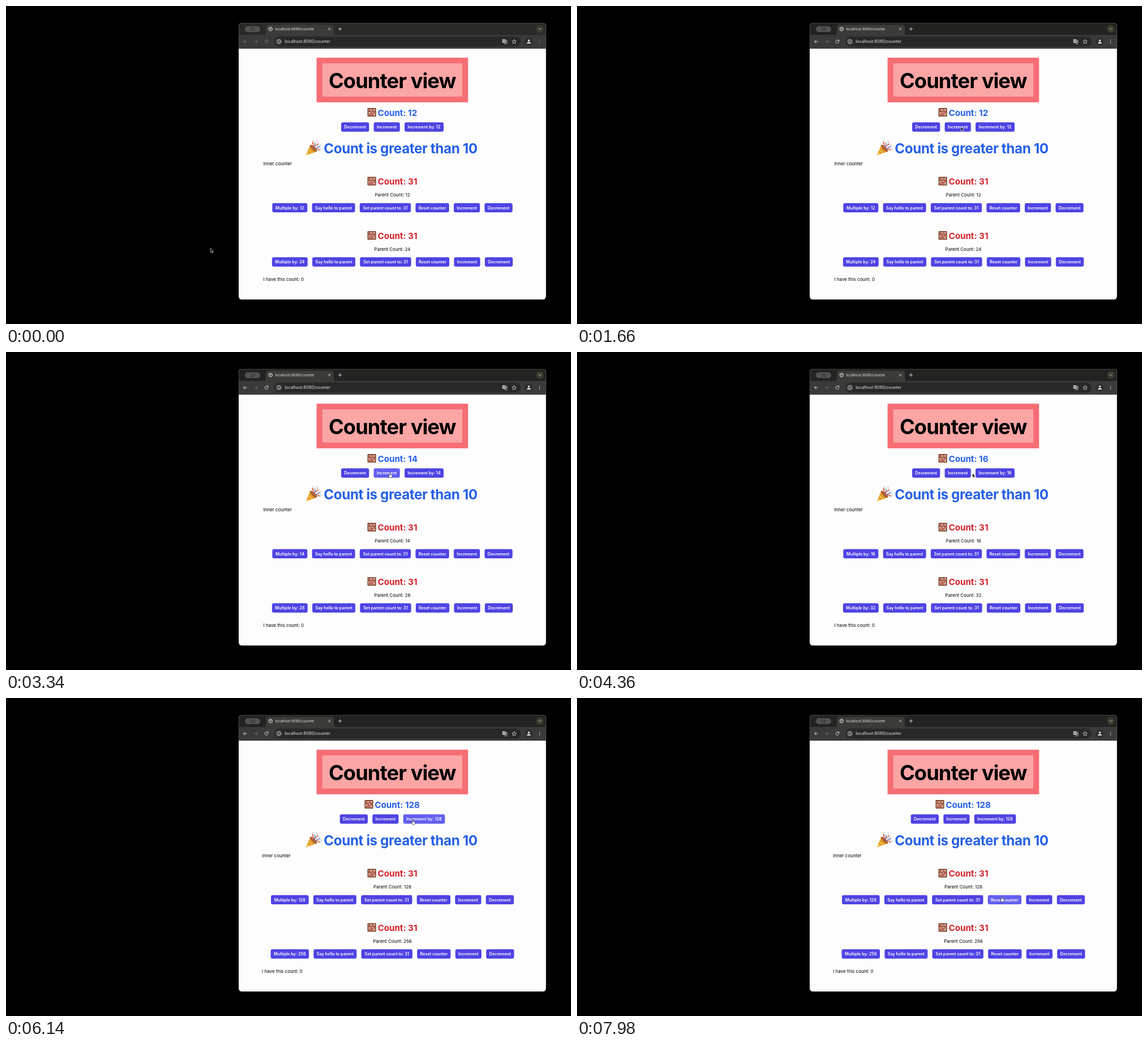
These frames come from a looping animation (998 px wide and 561 px high, 8 s). An HTML page:

```html
<!DOCTYPE html>
<html lang="en">
<head>
<meta charset="utf-8">
<title>Counter view</title>
<style>
html, body { margin: 0; width: 100%; height: 100%; overflow: hidden; background: #000; }
svg { display: block; width: 100%; height: 100%; font-family: Inter, "Liberation Sans", sans-serif; font-optical-sizing: none; }
.mid { text-anchor: middle; }
.title { font-size: 36.3px; font-weight: 700; letter-spacing: -.026em; }
.note { font-size: 24.2px; font-weight: 700; letter-spacing: -.016em; fill: #2560e8; }
.count { font-size: 15.2px; font-weight: 700; }
.body { font-size: 8px; }
.btn { font-size: 7.25px; font-weight: 600; fill: #fff; text-anchor: middle; }
.line { fill: none; stroke-width: .9; stroke-linecap: round; stroke-linejoin: round; }
</style>
</head>
<body>
<svg viewBox="0 0 998 561">
  <defs>
    <g id="abacus">
      <rect width="15" height="15" rx=".8" fill="#74371f"/>
      <rect x="1.6" y="1.6" width="11.8" height="11.8" fill="#ead2c2"/>
      <path d="M3.4 1V14M6.1 1V14M8.9 1V14M11.6 1V14" stroke="#8b4a2c" stroke-width=".7"/>
      <path d="M3.4 2v5M6.1 6v6.6M8.9 2v3.4M8.9 8.4v4.4M11.6 4.6v5M3.4 10.4v2.6" stroke="#a8322a" stroke-width="2.1" stroke-dasharray="1.5 .3"/>
      <path d="M1 5.6H14" stroke="#74371f" stroke-width=".8"/>
    </g>
    <g id="popper">
      <path d="M0 25L7.5 6.5Q16 9.5 19 18.3Z" fill="#f3b73b"/>
      <path d="M3.2 17.2L8.4 22M5.2 12.2L13.6 20.2" stroke="#cf8424" stroke-width="1.3"/>
      <ellipse cx="13.4" cy="12.5" rx="8.2" ry="3.3" transform="rotate(46 13.4 12.5)" fill="#a8642a"/>
      <path d="M11 11Q15 7 11.5 1.5M14 13Q17 6 22 5M16 15Q20 12 25 16" fill="none" stroke-width="1.5" stroke-linecap="round" stroke="#e0523f"/>
      <path d="M13 11Q17 8 16 3M17 14Q21 9 25 10" fill="none" stroke-width="1.3" stroke-linecap="round" stroke="#4386d8"/>
      <g id="bits"></g>
    </g>
    <path id="arrow" d="M0 0V7.3L1.7 5.8L2.9 8.4L4.1 7.9L3 5.3L5.2 5.2Z" fill="#000" stroke="#fff" stroke-width=".65"/>
    <path id="hand" d="M-.9 .8a.9.9 0 0 1 1.8 0V3.2L3.5 3.9Q4.5 4.2 4.3 5.3L3.9 7.5Q3.7 8.4 3 8.4H-.2Q-.8 8.4-1.2 7.7L-2.6 5.4Q-2.8 4.5-2 4.6L-.9 5.5Z" fill="#fff" stroke="#111" stroke-width=".6"/>
    <clipPath id="frame"><rect x="411" y="30" width="542.8" height="487.8" rx="5.5"/></clipPath>
  </defs>
  <g clip-path="url(#frame)">
    <rect x="411" y="30" width="543" height="488" fill="#fdfdfd"/>
    <rect id="strip" x="411" y="30" width="543" height="22"/>
    <rect x="411" y="51" width="543" height="24.3" fill="#3a3a3b"/>
    <path d="M455 51.5Q459 51.5 459 47V38Q459 33 464 33H574Q579 33 579 38V47Q579 51.5 583 51.5Z" fill="#3b3b38"/>
    <rect x="422" y="35.7" width="27" height="10.4" rx="5.2" fill="#535353"/>
    <path d="M431 39H440M433 41H440M431 43.2H440" stroke="#35362f" stroke-width="1"/>
    <rect x="474" y="54" width="435" height="17.6" rx="8.8" fill="#282829"/>
  </g>
  <path d="M411.3 75V35.5Q411.3 30.3 416.5 30.3H948.3Q953.5 30.3 953.5 35.5V75" fill="none" stroke="#5d5d58" stroke-width=".6"/>
  <g class="line" stroke="#dedede">
    <circle cx="467.2" cy="40.6" r="3.3"/>
    <path d="M464.4 39.2L467 40.3L466.4 42L468 43.5M467.3 37.6L468.3 39.6L470.2 40"/>
    <path d="M569.6 38.9L573 42.3M573 38.9L569.6 42.3M587.2 40.6H592.8M590 37.8V43.4"/>
    <circle cx="943" cy="40.6" r="6.6" fill="#3d3e31" stroke="none"/>
    <path d="M941.2 39.8L943 41.6L944.8 39.8"/>
    <circle cx="482" cy="62.8" r="6.3" fill="#38393a" stroke="none"/>
    <circle cx="482" cy="62.8" r="3.4"/><path d="M482 62.6V64.4M482 61V61.1"/>
    <path d="M897.6 59.2L898.7 61.7L901.4 61.9L899.3 63.7L900 66.4L897.6 64.9L895.2 66.4L895.9 63.7L893.8 61.9L896.5 61.7Z" stroke-width=".8"/>
    <rect x="876.8" y="58.8" width="5.6" height="6.2" rx=".8" fill="#c9c9c9" stroke="none"/>
    <path d="M882.8 60.6H885V66.8H880.4M882 63H884.2M883 63L881.8 65.4" stroke-width=".7"/>
    <path d="M880.8 61H879Q878 61.8 879 62.8H880.6V62" stroke="#282829" stroke-width=".7"/>
    <circle cx="923.5" cy="62.8" r="7.2" fill="#2f2f31" stroke="none"/>
    <circle cx="923.5" cy="61" r="1.8" fill="#e4e4e4" stroke="none"/>
    <path d="M920 66.3Q920 63.4 923.5 63.4Q927 63.4 927 66.3Z" fill="#e4e4e4" stroke="none"/>
  </g>
  <path d="M438 62.8H444M441.5 60.2L444.1 62.8L441.5 65.4" class="line" stroke="#77777a"/>
  <g id="tools" class="line">
    <path d="M425.4 62.8H419.6M422.2 60.2L419.6 62.8L422.2 65.4"/>
    <path d="M462.6 61.4A2.9 2.9 0 1 0 462.8 63.6M462.9 59.6V61.7H460.8"/>
    <path d="M942.5 60.2V60.3M942.5 62.8V62.9M942.5 65.4V65.5" stroke-width="1.4"/>
  </g>
  <text x="475.4" y="42.8" font-size="6.25" fill="#e2e2e0">localhost:8080/counter</text>
  <text x="492.3" y="65.4" font-size="7.3" fill="#e8e8e8">localhost:8080/counter</text>
  <rect x="548.6" y="91.2" width="267.6" height="78.7" fill="#f56e74"/>
  <rect x="558.7" y="101.2" width="247.3" height="58.5" fill="#fba5a5"/>
  <text class="title mid" x="682.2" y="145">Counter view</text>
  <use href="#popper" x="529.7" y="238.5"/>
  <text class="note mid" x="697" y="260.3">Count is greater than 10</text>
  <g id="page"></g>
  <use id="cursor"/>
</svg>
<script>
const LOOP = 8000, MID = 682.5, GAP = 8.25;
const $ = id => document.getElementById(id);

const BITS = ["#e0523f", "#4386d8", "#f3b73b", "#55a860", "#b55fc0"];
$("bits").innerHTML = Array.from({ length: 14 }, (_, i) => {
  const a = -1.75 + i * 0.17, r = 8 + (i * 5 % 7);
  return `<circle cx="${13 + r * Math.cos(a)}" cy="${12 + r * Math.sin(a)}" r=".75" fill="${BITS[i % 5]}"/>`;
}).join("");

// start, end, then where the pointer lands
const MOVES = [
  [60, 760, 678, 232.8], [1050, 1350, 678, 213.2], [4180, 4540, 718.6, 215], [6550, 7500, 750.3, 350.8]
];
const START = [361.2, 427.4];
// time of each click and the count it leaves
const CLICKS = [[0, 12], [2700, 13], [3060, 14], [3480, 15], [3840, 16], [4960, 32], [5340, 64], [5740, 128]];
const FOCUS = 1560, HOVER = 2440;

const ease = p => p * p * (3 - 2 * p);

function pointer(t) {
  let [x, y] = START;
  for (const [from, to, tx, ty] of MOVES) {
    const p = ease(Math.min(1, Math.max(0, (t - from) / (to - from))));
    x += (tx - x) * p;
    y += (ty - y) * p;
  }
  return [x, y];
}

const digits = n => [...String(n)].reduce((w, d) => w + (d === "1" ? 3.7 : 4.6), 0);

function place(items, y) {
  const total = items.reduce((w, b) => w + b[1], GAP * (items.length - 1));
  let x = MID - total / 2;
  return items.map(([label, w]) => {
    const b = { label, w, x, y: y - 8.2 };
    x += w + GAP;
    return b;
  });
}

const INC = ["Increment", 46.2], DEC = ["Decrement", 49.3];
const innerRow = (n, y) => place([
  ["Multiple by: " + n, 53.7 + digits(n)], ["Say hello to parent", 76],
  ["Set parent count to: 31", 90.3], ["Reset counter", 59.3], INC, DEC
], y);

const buttons = n => [
  ...place([DEC, INC, ["Increment by: " + n, 60.7 + digits(n)]], 213.5),
  ...innerRow(n, 355.9),
  ...innerRow(2 * n, 451.5)
];

const drawButton = (b, hot) =>
  `<rect x="${b.x}" y="${b.y}" width="${b.w}" height="16.4" rx="3" fill="${hot ? "#635ff0" : "#4e43e3"}"/>` +
  `<text class="btn" x="${b.x + b.w / 2}" y="${b.y + 10.8}">${b.label}</text>`;

function heading(n, y, color) {
  const shift = 5.1 * (String(n).length - 2);
  return `<use href="#abacus" x="${638.6 - shift}" y="${y - 13.4}"/>` +
    `<text class="count" x="${656.4 - shift}" y="${y}" fill="${color}">Count: ${n}</text>`;
}

const parentCount = (n, y) => `<text class="body mid" x="${MID}" y="${y}">Parent Count: ${n}</text>`;

function drawPage(n, list, hot) {
  const left = list[9].x - 15.5;
  return heading(n, 193.5, "#2560e8") + heading(31, 315, "#d32229") + heading(31, 410.6, "#d32229") +
    parentCount(n, 336) + parentCount(2 * n, 431.6) +
    `<text class="body" x="${left}" y="281">Inner counter</text>` +
    `<text class="body" x="${left}" y="484.6">I have this count: 0</text>` +
    list.map(b => drawButton(b, b === hot)).join("");
}

let shown = "";
function render(t) {
  const [x, y] = pointer(t);
  const n = CLICKS.filter(c => c[0] <= t).pop()[1];
  const list = buttons(n);
  const hot = t >= HOVER && list.find(b => x >= b.x && x <= b.x + b.w && y >= b.y && y <= b.y + 16.4);
  const key = n + "/" + list.indexOf(hot);
  if (key !== shown) {
    shown = key;
    $("page").innerHTML = drawPage(n, list, hot);
  }
  const active = t >= FOCUS;
  $("tools").setAttribute("stroke", active ? "#dedede" : "#77777a");
  $("strip").setAttribute("fill", active ? "#232422" : "#2a2a27");
  $("cursor").setAttribute("href", hot ? "#hand" : "#arrow");
  $("cursor").setAttribute("transform", `translate(${x} ${y})`);
}

const began = performance.now();
function tick() {
  render((performance.now() - began) % LOOP);
  requestAnimationFrame(tick);
}
tick();
</script>
</body>
</html>
```
